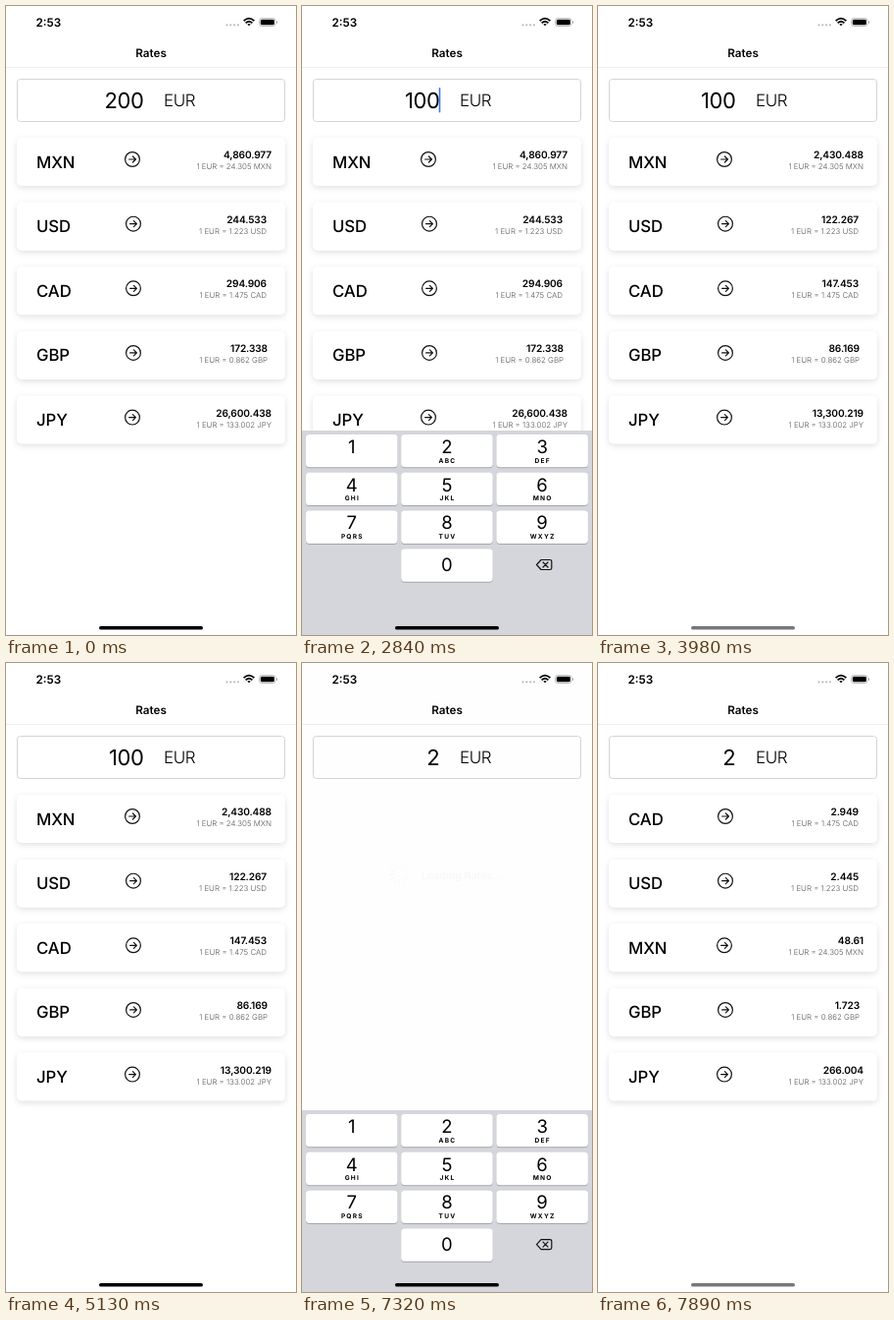
Write an HTML page that moves like this. It is 296 px wide and 640 px high and loops after 8000 ms.

```html
<!DOCTYPE html>
<html lang="en">
<head>
<meta charset="utf-8">
<title>Rates</title>
<style>
  html, body { margin: 0; width: 100%; height: 100%; overflow: hidden; background: #fff; }
  svg { display: block; width: 296px; height: 640px; font-family: Inter, "Noto Sans", sans-serif; text-rendering: geometricPrecision; }
  .end { text-anchor: end; }
  .mid { text-anchor: middle; }
  .line { fill: none; stroke: #111; stroke-width: 1.2; stroke-linecap: round; stroke-linejoin: round; }
  .card { fill: #fff; filter: drop-shadow(0 2px 3px rgba(0, 0, 0, .12)); }
  .key { fill: #fff; filter: drop-shadow(0 1px 0 #a4a6aa); }
  .key.down { fill: #b6c0cb; }
  .code { font-size: 16.8px; font-weight: 450; letter-spacing: -.1px; }
  .amount { font-size: 10.2px; font-weight: 600; letter-spacing: -.15px; }
  .rate { font-size: 7.9px; font-weight: 300; fill: #555; }
  .digit { font-size: 18.5px; }
  .letters { font-size: 6.6px; font-weight: 700; letter-spacing: 1.2px; }
</style>
</head>
<body>
<svg viewBox="0 0 296 640">
  <g id="status">
    <text x="30.5" y="21" font-size="11.8" font-weight="600">2:53</text>
    <g fill="#bbb">
      <circle cx="225.5" cy="19.3" r="1.1"/><circle cx="229.3" cy="19.3" r="1.1"/>
      <circle cx="233.1" cy="19.3" r="1.1"/><circle cx="236.9" cy="19.3" r="1.1"/>
    </g>
    <g fill="none" stroke="#000" stroke-width="1.7">
      <path d="M242.6 15.2Q248 10.2 253.4 15.2M244.6 17.3Q248 14.2 251.4 17.3"/>
      <path d="M246.3 18.6Q248 17.2 249.7 18.6L248 20.3Z" fill="#000" stroke="none"/>
    </g>
    <rect x="258.5" y="12.5" width="16.5" height="8" rx="2.4" fill="none" stroke="#b0b0b0" stroke-width=".8"/>
    <rect x="259.8" y="13.7" width="14" height="5.6" rx="1.3"/>
    <path d="M276 15v3q1-.4 1-1.5t-1-1.5" fill="#999"/>
  </g>
  <text class="mid" x="148" y="52" font-size="11.7" font-weight="600">Rates</text>
  <path d="M0 62.5H296" stroke="#eee"/>
  <rect x="11.5" y="74.5" width="273" height="43" rx="3" fill="#fff" stroke="#d4d4d4"/>
  <text id="value" class="end" x="140.4" y="104" font-size="22" letter-spacing="-.4"></text>
  <rect id="caret" x="139.7" y="83" width="1.6" height="25.5" rx=".8" fill="#3d78e6"/>
  <text x="161" y="102" font-size="17" font-weight="300" letter-spacing="-.4">EUR</text>
  <g id="cards"></g>
  <rect id="shade" width="296" height="640"/>
  <g id="hud">
    <rect x="-78" y="-28" width="155.5" height="56" rx="5" fill="#fff"/>
    <g id="spinner" transform="translate(-44.5 -1)" stroke="#444" stroke-width="1.2" stroke-linecap="round"></g>
    <text x="-24" y="3.6" font-size="9.7" font-weight="600">Loading Rates...</text>
  </g>
  <g id="keyboard"><rect y="432" width="296" height="210" fill="#d4d6db"/></g>
  <rect id="home" x="95" y="630.9" width="106" height="3.7" rx="1.85"/>
</svg>
<script>
const $ = id => document.getElementById(id);
const LOOP = 8000, STEP = 110;

// Each track lists [start ms, value]; a value holds until the next one.
const values = [[0, '200'], [500, ''], [1530, '1'], [2330, '10'], [2840, '100'], [5240, ''], [6270, '2']];
const carets = [[0, 0], [500, 1], [1310, 0], [1530, 1], [1730, 0], [2000, 1], [2950, 0],
  [5240, 1], [6040, 0], [6270, 1], [6460, 0], [6860, 1], [7100, 0]];
const presses = [[0, ''], [1420, '1'], [1730, ''], [2000, '0'], [2840, ''], [6150, '2'], [6460, '']];
const lists = [[0, 200], [3300, 0], [3850, 100], [7210, 0], [7760, 2]];
const homes = [[0, '#000'], [3960, '#777'], [5130, '#000'], [7870, '#777']];
const bursts = [[0, 0], [500, 500], [3190, 3190], [5130, 5130], [7100, 7100]];
const at = (track, t) => track.findLast(k => k[0] <= t)[1];

// code: [rate, right edge of the figures, centre of the arrow]
const currencies = {
  MXN: [24.304884, 271, 129], USD: [1.222666, 266, 130], CAD: [1.47453, 266, 130],
  GBP: [.86169, 267, 130], JPY: [133.00219, 271, 129]
};
const money = n => n.toLocaleString('en-US', { maximumFractionDigits: 3 });

function card(code, i, amount) {
  const [rate, right, arrow] = currencies[code];
  return `<g transform="translate(0 ${134 + i * 65.65})">
    <rect class="card" x="11" width="274" height="49" rx="5"/>
    <text class="code" x="31" y="30.5">${code}</text>
    <g class="line" transform="translate(${arrow} 22)"><circle r="7.4"/><path d="M-3.4 0H3.4M.4-3L3.4 0L.4 3"/></g>
    <text class="amount end" x="${right}" y="21.2">${money(rate * amount)}</text>
    <text class="rate end" x="${right}" y="32">1 EUR = ${money(rate)} ${code}</text></g>`;
}

let shown;
function showCards(amount) {
  if (amount === shown) return;
  shown = amount;
  const order = amount === 2 ? 'CAD USD MXN GBP JPY' : 'MXN USD CAD GBP JPY';
  $('cards').innerHTML = amount ? order.split(' ').map((c, i) => card(c, i, amount)).join('') : '';
}

const letters = ['', 'ABC', 'DEF', 'GHI', 'JKL', 'MNO', 'PQRS', 'TUV', 'WXYZ'];
function key(digit, col, row, sub) {
  const x = 4 + col * 97.2, y = 436 + row * 38.8, mid = x + 46.7;
  return `<rect id="key${digit}" class="key" x="${x}" y="${y}" width="93.5" height="33.3" rx="3.6"/>
    <text class="digit mid" x="${mid}" y="${y + (digit ? 18.8 : 22.8)}">${digit}</text>
    <text class="letters mid" x="${mid + .6}" y="${y + 28.6}">${sub}</text>`;
}
$('keyboard').innerHTML += letters.map((s, i) => key(i + 1, i % 3, Math.floor(i / 3), s)).join('') + key(0, 1, 3, '') +
  '<path class="line" d="M239.5 568.5L244 563.5H253Q254.8 563.5 254.8 565.3V571.7Q254.8 573.5 253 573.5H244ZM246 566L251 571M251 566L246 571"/>';
$('spinner').innerHTML = '<path d="M0-5.4V-9.2"/>'.repeat(12);
const spokes = [...$('spinner').children];
spokes.forEach((s, i) => s.setAttribute('transform', `rotate(${i * 30})`));
const keys = [...document.querySelectorAll('.key')];

const clamp = x => Math.min(1, Math.max(0, x));
const spring = ms => {
  const u = Math.max(0, ms) * .01826;
  return 1 - (1 + u) * Math.exp(-u);
};

function draw(t) {
  $('value').textContent = at(values, t);
  $('caret').style.opacity = at(carets, t);
  $('home').style.fill = at(homes, t);
  showCards(at(lists, t));
  const pressed = 'key' + at(presses, t);
  keys.forEach(k => k.classList.toggle('down', k.id === pressed));

  // Movement advances in short held steps.
  const start = at(bursts, t);
  const now = start + Math.floor((t - start) / STEP) * STEP;
  const second = t >= 5130;
  const opened = now - (second ? 5240 : 500);
  const closed = now - (second ? 7100 : 3190);
  const up = spring(opened - 60) * (1 - spring(closed - 189));
  $('keyboard').setAttribute('transform', `translate(0 ${208 * (1 - up)})`);
  $('keyboard').style.display = up < .002 ? 'none' : '';

  const enter = clamp((closed - 217) / 150), leave = clamp((closed - 600) / 150);
  const alpha = enter * (1 - leave);
  $('shade').style.opacity = .272 * alpha;
  $('hud').style.opacity = alpha;
  const y = 214 + 106 * enter;
  $('hud').setAttribute('transform', `translate(148 ${y}) scale(${1.1 - .1 * enter - .2 * leave})`);
  const head = Math.floor(closed / 83) + 8;
  spokes.forEach((s, i) => s.style.opacity = 1 - ((head - i + 24) % 12) * .078);
}

const begin = performance.now();
function tick() {
  draw((performance.now() - begin) % LOOP);
  requestAnimationFrame(tick);
}
tick();
</script>
</body>
</html>
```
